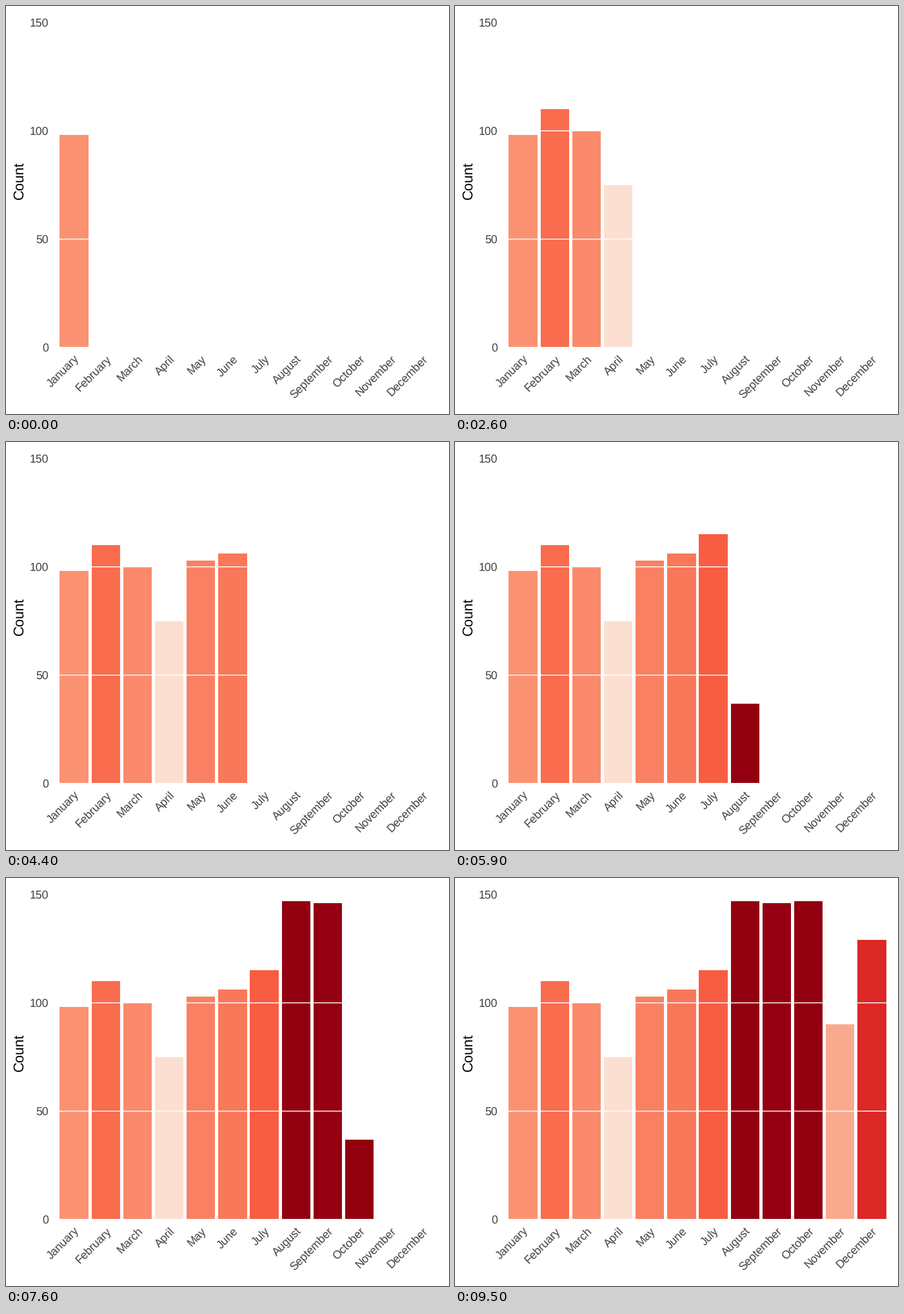
Recreate the animation shown at these times as a matplotlib script. Size 687 px wide and 633 px high, loop 10 s.

```python
import matplotlib.pyplot as plt
from matplotlib.animation import FuncAnimation
from matplotlib.patches import Rectangle

W, H, DPI = 687, 633, 72          # at 72 dpi one point equals one pixel
STEP_MS, LOOP_MS, GROW_MS = 100, 10000, 400
BASE_Y, UNIT = 529.65, 3.36       # zero line and pixels per count
FIRST_X, PITCH, BAR_W = 83.4, 49.18, 44.26
LABEL_SIZE, TITLE_SIZE = 17.6, 22
LABEL_COLOR = "#404040"

MONTHS = [
    ("January", 98, "#fa9272"),
    ("February", 110, "#f96c4e"),
    ("March", 100, "#fa8a6b"),
    ("April", 75, "#fcdfd0"),
    ("May", 103, "#f98063"),
    ("June", 106, "#f97859"),
    ("July", 115, "#f85d42"),
    ("August", 147, "#920010"),
    ("September", 146, "#940011"),
    ("October", 147, "#920010"),
    ("November", 90, "#f9aa8e"),
    ("December", 129, "#dc2827"),
]

plt.rcParams["font.family"] = "Liberation Sans"
plt.rcParams["text.hinting"] = "none"
plt.rcParams["toolbar"] = "None"

fig = plt.figure(figsize=(W / DPI, H / DPI), dpi=DPI, facecolor="white")
ax = fig.add_axes([0, 0, 1, 1])
ax.set_xlim(0, W)
ax.set_ylim(H, 0)
ax.axis("off")


def count_y(count):
    return BASE_Y - count * UNIT


def start_time(month):
    """Time at which a month's bar makes its first step."""
    if month == 0:
        return -LOOP_MS
    return 500 + 900 * (month - 1) - 100 * max(0, month - 8)


def label(x, y, text, size=LABEL_SIZE, color=LABEL_COLOR, ha="right", angle=0):
    ax.text(x, y, text, fontsize=size, color=color, ha=ha, va="baseline",
            rotation=angle, rotation_mode="anchor")


bars = []
for i, (name, _, color) in enumerate(MONTHS):
    left = FIRST_X + i * PITCH
    x0, x1 = round(left), round(left + BAR_W)
    bar = Rectangle((x0, round(BASE_Y)), x1 - x0, 0, facecolor=color,
                    linewidth=0, antialiased=False, zorder=1)
    bars.append(ax.add_patch(bar))
    label(left + BAR_W / 2 + 8.9, 548.4, name, angle=45)

for count in (0, 50, 100, 150):
    y = count_y(count)
    ax.plot([72, 680], [y, y], color="white", linewidth=1.4, snap=False, zorder=2)
    label(66.2, y + 6.2, str(count))

label(26.8, 270.3, "Count", TITLE_SIZE, "black", "center", 90)


def update(frame):
    now = frame * STEP_MS
    for i, (bar, (_, count, _)) in enumerate(zip(bars, MONTHS)):
        grown = (now - start_time(i) + STEP_MS) / GROW_MS
        grown = min(max(grown, 0), 1)
        bar.set_visible(grown > 0)
        bar.set_height(round(count_y(count * grown)) - round(BASE_Y))
    return bars


anim = FuncAnimation(fig, update, frames=LOOP_MS // STEP_MS, interval=STEP_MS,
                     repeat=True, repeat_delay=0, blit=False)
plt.show()
```
